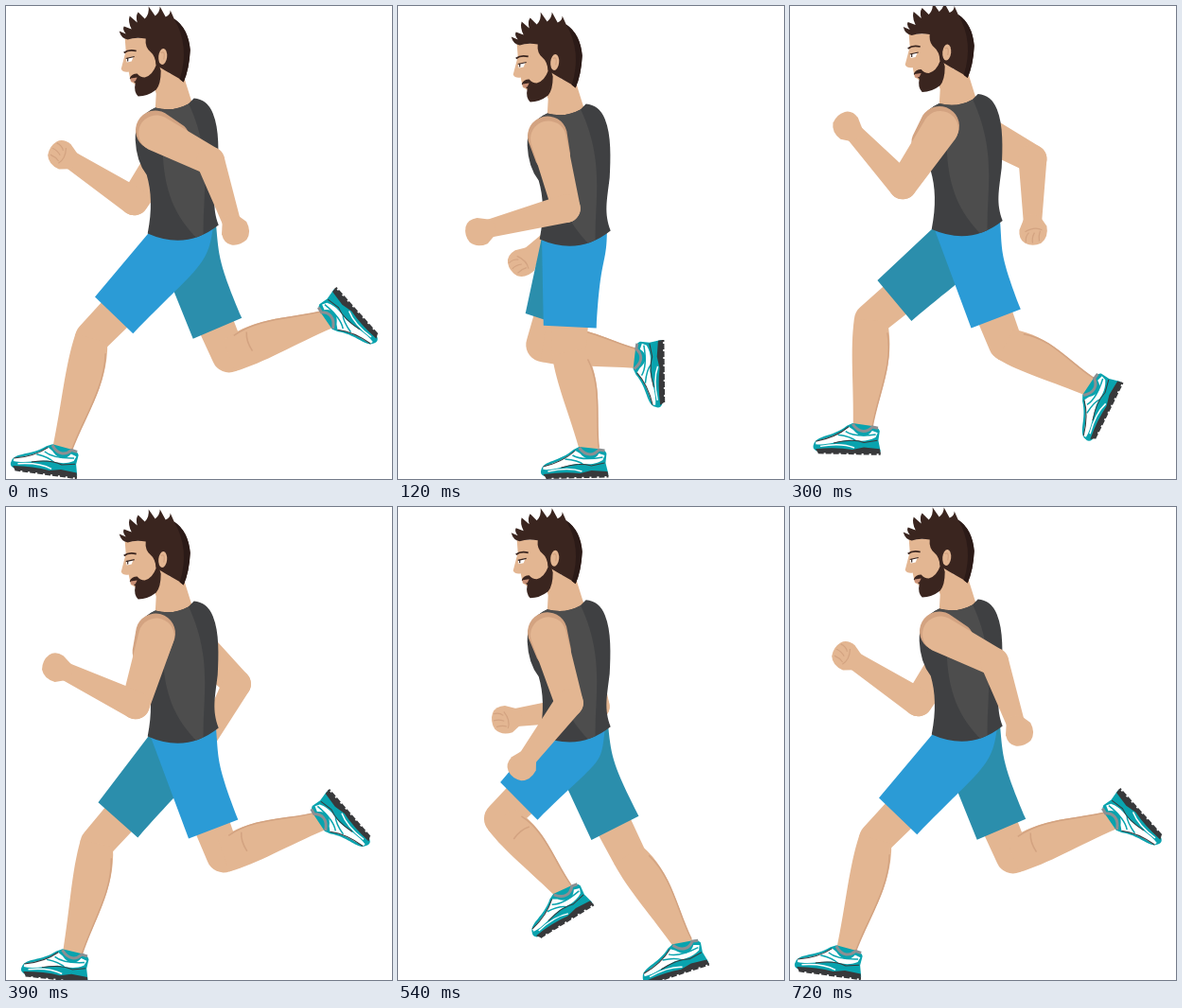
Animation, 408 px wide and 500 px high, one loop 0.75 s. Source, as an HTML page with a canvas:

```html
<!DOCTYPE html>
<html lang="en">
<head>
<meta charset="utf-8">
<title>Runner</title>
<style>
html, body { margin: 0; width: 100%; height: 100%; overflow: hidden; background: #fff; }
canvas { display: block; }
</style>
</head>
<body>
<canvas id="stage" width="408" height="500"></canvas>
<script>
const ctx = document.getElementById('stage').getContext('2d');
const LOOP = 750, STEP = 30;
const STRIDE = 345, CYCLE = 2 * STRIDE; // moving part of each half loop; the rest holds the landing
const SKIN = '#e3b692', SHADE = '#d3a381', HAIR = '#3a251f';
const CLOTH = '#4d4d4d', CLOTH_DARK = '#3f4042', TEAL = '#09a3ae', SOLE = '#38393b';
const { sin, cos, abs, max, min, PI } = Math;
const rad = degrees => degrees * PI / 180;

// Periodic monotone cubic through rows of [time, ...values]
function track(period, rows) {
  const row = i => {
    const turn = Math.floor(i / rows.length), [t, ...v] = rows[i - turn * rows.length];
    return [t + turn * period, ...v];
  };
  return time => {
    const t = time % period, i = rows.findLastIndex(r => r[0] <= t);
    const [a, b, c, d] = [-1, 0, 1, 2].map(k => row(i + k));
    const h = c[0] - b[0], u = (t - b[0]) / h;
    const slope = (p, q, k) => (q[k] - p[k]) / (q[0] - p[0]);
    const tangent = (p, q) => p * q > 0 ? 2 * p * q / (p + q) * h : 0;
    return b.slice(1).map((v, j) => {
      const k = j + 1, mid = slope(b, c, k), rise = mid * h;
      const m0 = tangent(slope(a, b, k), mid), m1 = tangent(mid, slope(c, d, k));
      return v + u * (m0 + u * (3 * rise - 2 * m0 - m1 + u * (m0 + m1 - 2 * rise)));
    });
  };
}

// Body drop, once per step
const bob = track(STRIDE, [[0, .5], [75, 10], [170, 1], [300, -4]]);

// Both legs share this gait: time, thigh angle and length, shin angle and length
const gait = track(CYCLE, [
  [0, -44, 137, -15, 121], [60, -32, 120, 3, 108], [120, -3, 107, 12, 106],
  [200, 27, 128, 33, 111], [300, 21, 117, 63, 100], [345, 23, 127, 110, 111],
  [395, 9, 104, 105, 99], [505, -45, 108, 43, 101], [645, -50, 131, -5, 113]]);

// Arms: time, upper arm angle, forearm angle
const nearSwing = track(CYCLE, [[0, 61, 19], [60, 47, -18], [180, -15, -119],
  [300, -32, -137], [420, 6, -80], [510, 17, -37]]);
const farSwing = track(CYCLE, [[0, -32, -123], [60, -28, -105], [180, 51, -11],
  [300, 60, 0], [420, 24, -65], [510, 15, -82]]);

// Angles run from straight down, positive towards the back
function limb(x0, y0, a, la, b, lb) {
  const x1 = x0 + la * sin(a), y1 = y0 + la * cos(a);
  return { x0, y0, x1, y1, x2: x1 + lb * sin(b), y2: y1 + lb * cos(b), a, b, lb };
}

function fill(path, color) {
  ctx.fillStyle = color;
  ctx.fill(new Path2D(path));
}
function line(path, color, width = 1.5) {
  ctx.strokeStyle = color;
  ctx.lineWidth = width;
  ctx.stroke(new Path2D(path));
}
function local(x, y, angle, draw) {
  ctx.save();
  ctx.translate(x, y);
  ctx.rotate(angle);
  draw();
  ctx.restore();
}
function taper(x1, y1, r1, x2, y2, r2, color = SKIN) {
  const a = Math.atan2(y2 - y1, x2 - x1), q = PI / 2;
  ctx.beginPath();
  ctx.arc(x1, y1, r1, a + q, a - q);
  ctx.arc(x2, y2, r2, a - q, a + q);
  ctx.fillStyle = color;
  ctx.fill();
}

function shoe() {
  fill('M-51 21C-48 11-32 13-17 0L-11-3 8-1Q16-1 18 4L17 14 20 26-48 28Q-53 26-51 21Z', TEAL);
  fill('M-49 18C-34 13-24 9-15 1L-10 4C-3 12 5 12 10 4L16 6 14 11C4 17-4 15-14 15-26 17-38 22-49 21Z', '#fff');
  line('M-11-2C-3 8 5 6 10 0L16 1', '#8c8f92', 3);
  line('M-26 10Q-12 11-6 16M-18 6Q-8 12 14 8', TEAL);
  line('M-49 18Q-28 13-15 1M-30 19Q-10 13 2 17L16 14', SOLE, 1);
  line('M-44 23Q-22 18-8 23', '#fff');
  fill('M-49 26Q-27 23-10 25L2 22 19 23 20 28-46 30Z', SOLE);
  ctx.setLineDash([6, 2]);
  line('M-46 29.5L20 28', SOLE, 3);
  ctx.setLineDash([]);
}

function drawLeg(phase, drop, color) {
  const [thigh, la, shin, lb] = gait(phase);
  const p = limb(186, 252 + drop, rad(thigh), la, rad(shin), lb);
  const { x0, y0, x1, y1, a, b } = p;
  const mix = k => [x0 + (x1 - x0) * k, y0 + (y1 - y0) * k];

  taper(...mix(.5), 20, x1, y1, 18);
  local(x1, y1, -b, () => {
    fill(`M-18 0C-20 ${lb * .3}-13 ${lb * .6}-10 ${lb + 3}L10 ${lb + 3}C13 ${lb * .7} 30 ${lb * .38} 17 0Z`, SKIN);
    line(`M10 ${lb}C13 ${lb * .7} 27 ${lb * .4} 18 12`, SHADE);
    if (b - a > .9) line('M17 26Q8 22-4 25', SHADE);
  });
  // The shoe lies flat in stance and points down once the shin swings up behind
  const tilt = max(0, -shin) * .6 - max(0, shin - 20) * 1.45;
  local(p.x2, p.y2, rad(tilt), shoe);

  const [cx, cy] = mix(.755), half = 28, s = sin(a), c = cos(a), along = 75 - 35 * s;
  const backX = cx + half * c, backY = cy - half * s;
  fill(`M152 ${238 + drop}L${cx - half * c} ${cy + half * s}L${backX} ${backY}
    C${backX - along * s} ${backY - along * c} ${221 + 10 * s} ${268 - 10 * s + drop}
    ${221 + 3 * s} ${232 + drop}Z`, color);
}

function drawArm(x, y, [upper, fore], reach, near) {
  const a = rad(upper), b = rad(fore);
  const p = limb(x, y, a, reach(a), b, 75 + 20 * sin(b) ** 2);
  if (near) taper(x, y, 21, x + 20 * sin(a), y + 20 * cos(a), 19, SHADE);
  taper(x + 1, y + 3, 19, p.x1, p.y1, 15);
  taper(p.x1, p.y1, 15, p.x2, p.y2, 9);
  local(p.x2, p.y2, -b, () => {
    fill('M-8-15Q0-18 8-14L15-4Q17 8 9 14 0 18-8 14-15 10-14 0Z', SKIN);
    if (!near) line('M-7 13Q-8 7-4 3M0 14Q-1 8 2 3M7 12Q6 6 8 1M-8 2Q2-4 10 0', SHADE, 1.2);
  });
}

function drawTorso() {
  fill('M152 72L158 92 157 110Q175 120 196 102L186 70Z', SKIN);
  ctx.save();
  ctx.clip(new Path2D(`M157 107Q176 112 192 103L198 97Q212 98 218 113C225 130 224 155 223 175
    220 200 217 212 224 231Q190 258 149 240C154 215 153 195 148 178Q137 164 136 141 135 117 157 107Z`));
  fill('M130 90H230V260H130Z', CLOTH_DARK);
  fill('M130 90H186C224 160 203 205 209 260L202 246C178 222 166 195 165 152L130 125Z', CLOTH);
  ctx.restore();
}

function drawHead() {
  fill('M125 34L126 47 121 66Q123 70 129 69L131 79 150 92 172 74 170 32Z', SKIN);
  fill(`M158 62Q157 52 152 48 146 43 147 34 136 32 128 35 121 34 119 26L126 29Q122 24 124 21L132 24Q128 16 130 10L138 17
    Q136 10 139 6L146 13Q151 8 150 0L157 10Q162 6 162 0L168 11Q173 9 173 4L177 13Q192 23 194 46
    193 66 187 80L182 76 168 68Z`, HAIR);
  fill('M177 13Q192 23 194 46 193 66 187 80L183 77Q194 42 177 13Z', '#2b1a17');
  fill(`M157 48L163 68Q163 82 158 88 149 95 139 95 134 90 136 81L130 76Q132 71 138 71
    141 75 146 75 154 73 158 62Z`, HAIR);
  fill('M131 76L138 75 136 79 132 80Z', '#c98f75');
  ctx.beginPath();
  ctx.ellipse(165, 53, 4.5, 8.5, .1, 0, 7);
  ctx.fillStyle = SKIN;
  ctx.fill();
  line('M163 49Q168 46 166 56', SHADE, 1.2);
  line('M124 49Q129 45 137 47', HAIR, 1.8);
  fill('M126 55L134 53 132 58 127 59Z', '#fff');
  line('M126 55L135 53M128 54L128 58', HAIR, 1.2);
}

function draw(t) {
  const half = LOOP / 2, step = Math.floor(t / half);
  const phase = step * STRIDE + min(t - step * half, STRIDE);
  // The far leg runs half a cycle apart, trailing and then leading a little
  const farPhase = phase + STRIDE - 30 * sin(2 * PI * phase / CYCLE) ** 3;
  const [drop] = bob(phase);

  ctx.fillStyle = '#fff';
  ctx.fillRect(0, 0, 408, 500);
  drawArm(186, 125 + drop, farSwing(phase), a => 90 - 10 * sin(a), false);
  drawLeg(farPhase, drop, '#2b8eac');
  drawLeg(phase, drop, '#2b9bd6');
  local(.7, drop, 0, () => {
    drawTorso();
    drawHead();
  });
  drawArm(158, 131 + drop, nearSwing(phase), a => 84 - 20 * abs(sin(a)), true);
}

function tick() {
  draw(Math.floor(performance.now() % LOOP / STEP) * STEP);
  requestAnimationFrame(tick);
}
tick();
</script>
</body>
</html>
```
